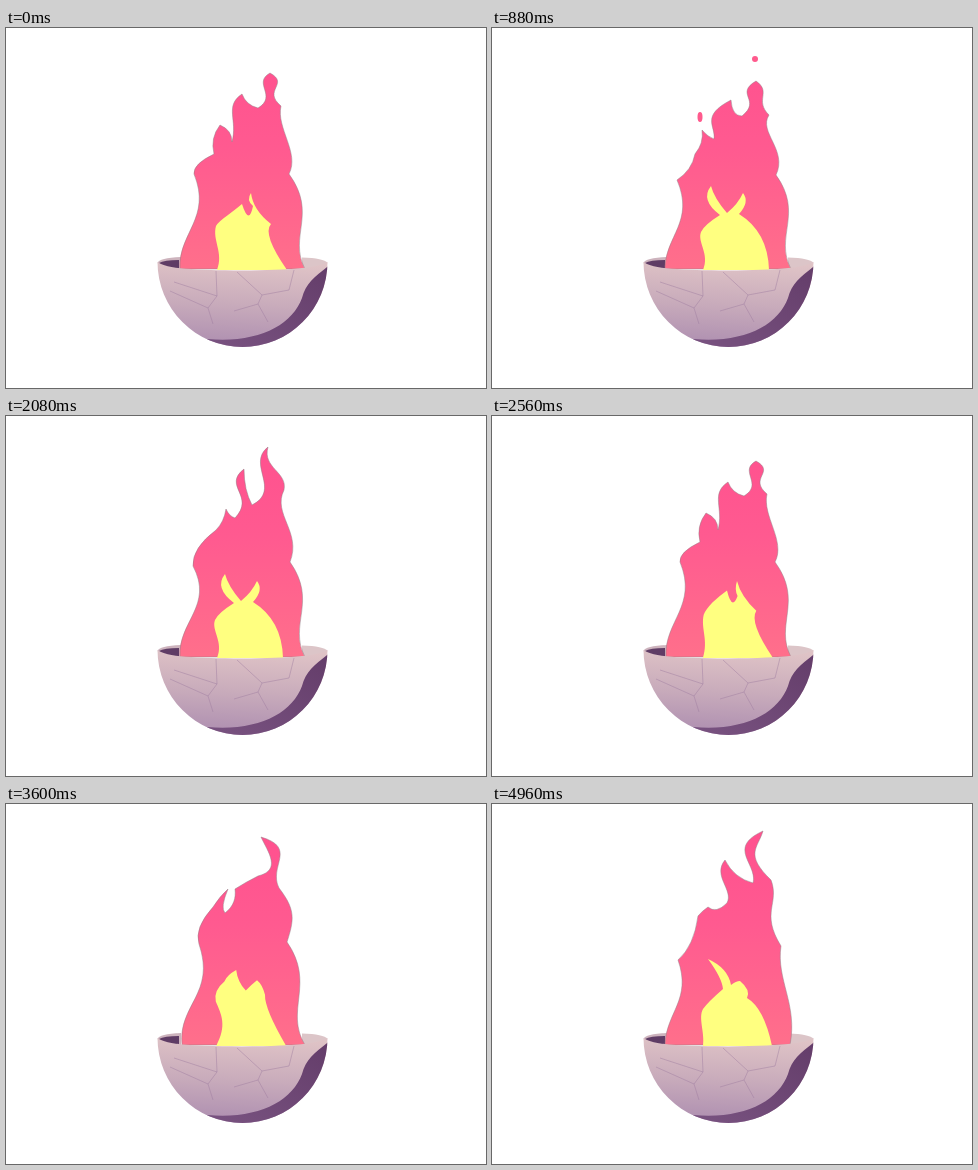
Write an HTML page without scripts that moves like this. It is 480 by 360 pixels and loops after 5.04 s.

```html
<!DOCTYPE html>
<html lang="en">
<head>
<meta charset="utf-8">
<title>Fire bowl</title>
<style>
html, body { margin: 0; width: 100%; height: 100%; overflow: hidden; background: #fff; }
svg { display: block; width: 100vw; height: 100vh; }

/* Flame: left side, shoulder, left tongue, middle tongue, right tongue, right side */
:root {
  --blunt: path("M174,241C172,205 206,190 188,146Q187,136 208,126Q204,110 214,97Q226,102 226,114C232,92 218,78 236,66Q240,77 252,80C272,68 246,55 264,45C284,56 256,62 275,78C270,100 294,125 283,146C312,186 282,208 299,241Z");
  --broken: path("M173,241C173,208 203,194 185,152Q200,142 203,126Q212,115 210,102Q216,109 222,111C224,98 208,88 239,72Q240,88 250,88C270,72 242,66 264,53C280,64 262,72 277,87C266,104 296,122 284,147C312,186 282,208 299,241Z");
  --hooked: path("M176,241C172,200 210,190 193,140Q188,124 207,103Q214,92 222,85Q214,104 219,109C228,102 230,94 229,85Q240,78 252,72C276,66 262,48 255,33C292,44 262,62 273,84C290,106 288,116 281,138C310,180 278,206 299,241Z");
  --forked: path("M174,241C172,205 208,190 187,150Q186,132 210,114Q218,106 220,93Q223,100 229,102C250,80 216,70 238,53Q238,74 246,89C276,74 240,48 262,31C256,52 282,56 278,74C266,98 296,116 284,146C312,186 282,208 299,241Z");
  --tall: path("M173,241C172,205 208,194 185,154Q186,136 213,112Q218,106 220,97Q224,104 231,102C250,86 222,74 238,51Q252,70 245,95C282,78 236,44 265,30C252,46 284,56 278,76C266,108 304,116 285,150C312,186 282,208 299,241Z");
  --split: path("M173,241C173,206 210,196 188,160Q204,142 200,124Q214,112 211,91Q218,95 228,90C240,86 252,72 247,57Q255,66 246,92C272,68 266,52 255,34C280,42 256,54 278,74C262,96 300,116 284,148C312,186 282,208 299,241Z");
  --wisp: path("M173,241C174,208 200,196 186,156Q202,142 206,112Q210,107 216,103Q224,110 235,99C242,86 220,72 233,56Q242,74 261,79C266,60 234,44 271,27C266,44 252,50 279,76C288,100 268,108 289,142C284,176 306,200 298,241Z");

  /* Core: left side, left plume, notch, right plume, right side */
  --peak: path("M211,242C218,225 206,212 210,198Q212,194 222,187Q230,181 236,176Q243,198 247,178Q240,172 245,165Q247,182 265,196Q256,206 281,242Z");
  --horns: path("M211,242C218,226 205,214 209,204Q212,197 228,187Q208,172 219,158Q222,170 235,185Q246,176 251,165Q258,174 247,186Q276,204 277,242Z");
  --block: path("M210,242C222,220 218,210 210,196Q206,184 216,175Q224,171 233,168Q234,180 241,187Q246,181 251,179Q256,182 262,192Q254,205 281,242Z");
  --claw: path("M210,242C209,218 224,214 222,203Q221,195 211,184Q209,176 229,166Q222,179 237,192Q256,182 245,165Q260,170 260,188Q262,210 281,242Z");
  --plume: path("M211,242C213,228 206,214 211,205Q216,198 231,185Q230,174 216,155Q236,164 239,181Q244,177 248,177Q259,186 255,194Q272,204 280,242Z");
}

/* 63 ticks of 80 ms; each segment advances once per tick */
.flame, .core, .spark { animation: burn 5040ms infinite; }
.flame { d: var(--blunt); fill: url(#heat); stroke: #8f7f86; stroke-opacity: .6; stroke-width: .8; stroke-linejoin: round; }
.core { d: var(--peak); fill: #ffff80; animation-name: glow; }
.spark { fill: #ff5a8d; animation-name: rise; }

@keyframes burn {
  0% { d: var(--blunt); animation-timing-function: steps(5); }
  7.936% { d: var(--split); animation-timing-function: steps(6); }
  17.46% { d: var(--broken); animation-timing-function: steps(5); }
  25.396% { d: var(--hooked); animation-timing-function: steps(5); }
  33.333% { d: var(--wisp); animation-timing-function: steps(5); }
  41.269% { d: var(--forked); animation-timing-function: steps(6); }
  50.793% { d: var(--blunt); animation-timing-function: steps(6); }
  60.317% { d: var(--tall); animation-timing-function: steps(7); }
  71.428% { d: var(--hooked); animation-timing-function: steps(7); }
  82.539% { d: var(--split); animation-timing-function: steps(5); }
  90.476% { d: var(--forked); animation-timing-function: steps(5); }
  98.412% { d: var(--wisp); animation-timing-function: steps(1); }
  100% { d: var(--blunt); }
}
@keyframes glow {
  0% { d: var(--peak); animation-timing-function: steps(6); }
  9.523% { d: var(--claw); animation-timing-function: steps(5); }
  17.46% { d: var(--horns); animation-timing-function: steps(5); }
  25.396% { d: var(--block); animation-timing-function: steps(5); }
  33.333% { d: var(--claw); animation-timing-function: steps(5); }
  41.269% { d: var(--horns); animation-timing-function: steps(5); }
  49.206% { d: var(--peak); animation-timing-function: steps(7); }
  60.317% { d: var(--claw); animation-timing-function: steps(3); }
  65.079% { d: var(--horns); animation-timing-function: steps(5); }
  73.015% { d: var(--block); animation-timing-function: steps(6); }
  82.539% { d: var(--claw); animation-timing-function: steps(5); }
  90.476% { d: var(--horns); animation-timing-function: steps(5); }
  98.412% { d: var(--plume); animation-timing-function: steps(1); }
  100% { d: var(--peak); }
}
@keyframes rise {
  0%, 14.284% { visibility: hidden; transform: translateY(6px); }
  14.285% { visibility: visible; transform: translateY(6px); animation-timing-function: steps(4); }
  20.634%, 100% { visibility: hidden; transform: translateY(-6px); }
}
</style>
</head>
<body>
<svg viewBox="0 0 480 360">
  <defs>
    <linearGradient id="heat" gradientUnits="userSpaceOnUse" x1="0" y1="40" x2="0" y2="240">
      <stop offset="0" stop-color="#ff528f"/>
      <stop offset=".4" stop-color="#ff5a90"/>
      <stop offset="1" stop-color="#ff6f8b"/>
    </linearGradient>
    <linearGradient id="stone" x1=".5" y1="0" x2=".4" y2="1">
      <stop offset="0" stop-color="#dfc3c6"/>
      <stop offset=".5" stop-color="#c8abbb"/>
      <stop offset="1" stop-color="#ad8eb0"/>
    </linearGradient>
    <linearGradient id="shade" x1="0" y1="1" x2="1" y2="0">
      <stop offset="0" stop-color="#7b5583"/>
      <stop offset="1" stop-color="#633c69"/>
    </linearGradient>
    <path id="bowl" d="M151.500,234C160,241 190,242 236,242.500C285,242 312,240 321.500,234A85,85 0 0 1 151.500,234Z"/>
    <clipPath id="inside"><use href="#bowl"/></clipPath>
  </defs>

  <path d="M151.500,235Q153,230 175,229V242H160Z" fill="#cdb3bd"/>
  <path d="M153,235Q158,232 173,232V242H160Z" fill="#5f3c65"/>
  <path d="M296,229.500Q318,230 321.500,235L312,242H296Z" fill="#dcc5c8"/>

  <path class="flame"/>
  <circle class="spark" cx="263" cy="31" r="3"/>
  <ellipse class="spark" cx="208" cy="89" rx="2.500" ry="5"/>
  <path class="core"/>

  <use href="#bowl" fill="url(#stone)"/>
  <g clip-path="url(#inside)">
    <path d="M186,309C245,319 285,300 296,270C300,254 310,248 326,235V325H186Z" fill="url(#shade)"/>
    <path d="M210,243L211,268 202,280 207,296M168,254L211,268M164,263L202,280M231,244L256,267 252,276 228,283M256,267L283,262 288,242M252,276L262,294"
      fill="none" stroke="#9c7b9d" stroke-opacity=".5" stroke-width=".9"/>
  </g>
</svg>
</body>
</html>
```
